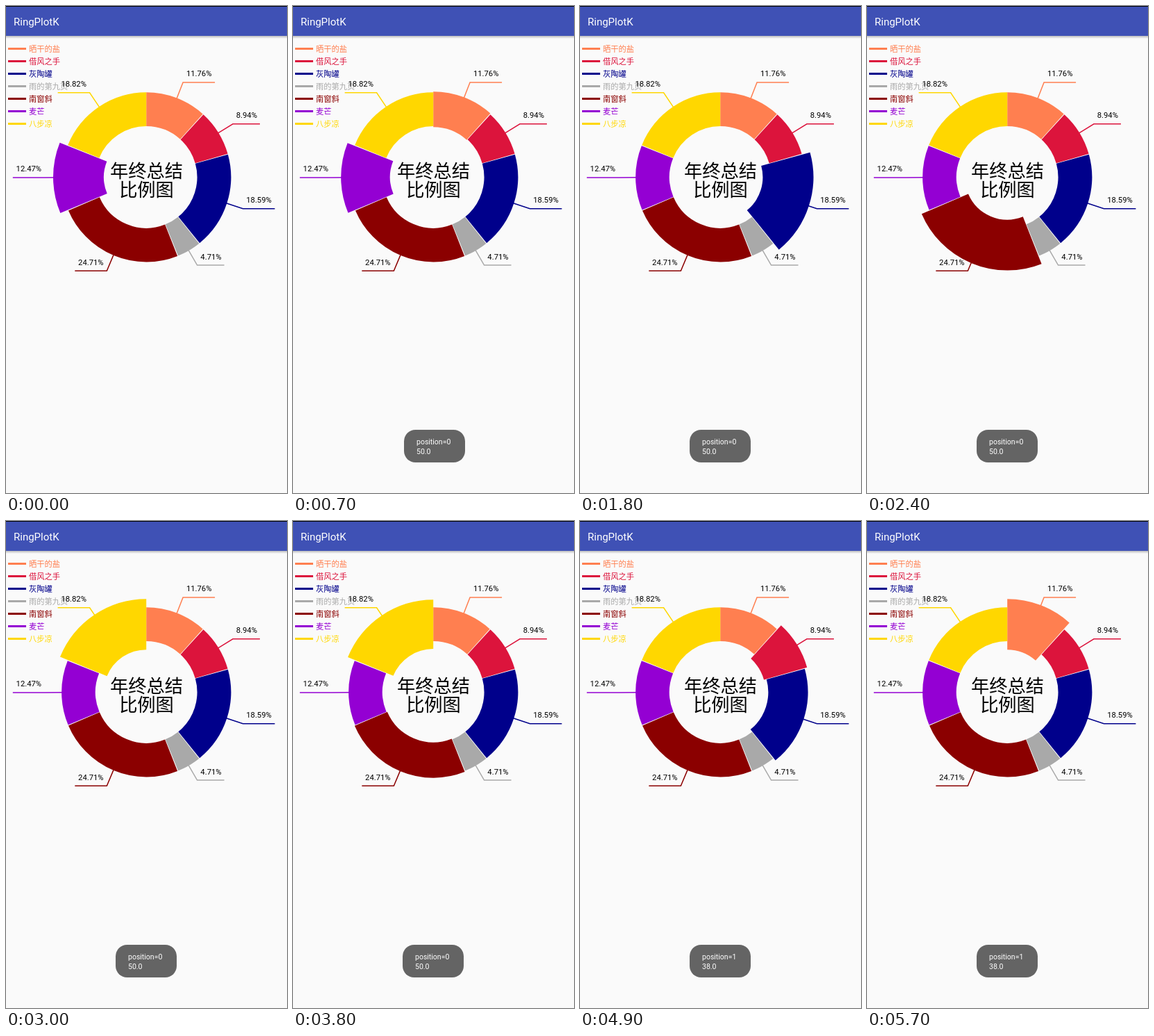
These frames come from a looping animation (405x701 px, 6.4 s). An HTML page:

```html
<!DOCTYPE html>
<html lang="zh">
<head>
<meta charset="utf-8">
<title>RingPlotK</title>
<style>
  html, body { margin: 0; width: 100%; height: 100%; overflow: hidden; background: #fafafa; }
  svg { display: block; width: 100vw; height: 100vh; }
  text { font-family: Roboto, "Noto Sans CJK SC", "Noto Sans CJK", sans-serif; }
  .title { font-size: 15px; fill: #fff; }
  .key, .label { font-size: 11.25px; }
  .heading { font-size: 26.25px; text-anchor: middle; }
  .toast text { font-size: 10.5px; fill: #fff; }
</style>
</head>
<body>
<svg viewBox="0 0 405 701">
  <defs>
    <linearGradient id="shade" x1="0" y1="0" x2="0" y2="1">
      <stop offset="0" stop-color="#000" stop-opacity=".25"/>
      <stop offset="1" stop-color="#000" stop-opacity="0"/>
    </linearGradient>
  </defs>
  <rect width="405" height="701" fill="#fafafa"/>
  <rect y="43" width="405" height="4" fill="url(#shade)"/>
  <rect width="405" height="43" fill="#3f51b5"/>
  <rect width="405" height="1" fill="#000"/>
  <text class="title" x="11" y="28">RingPlotK</text>
  <g id="legend"></g>
  <g id="leaders" fill="none" stroke-width="1.5"></g>
  <g id="ring" fill="none"></g>
  <g id="labels"></g>
  <text class="heading" x="202.5" y="247">年终总结</text>
  <text class="heading" x="202.5" y="273.5">比例图</text>
  <g class="toast" id="toast">
    <rect x="158" y="610" width="88" height="47" rx="16.5" fill="#646464"/>
    <text id="line1" x="176" y="631"></text>
    <text id="line2" x="176" y="645"></text>
  </g>
</svg>
<script>
const LOOP = 6400, TICK = 100;
const CX = 202.2, CY = 246.4, R = 122, MID = 97.7, THIN = 48.8, THICK = 73;

const slices = [
  { name: '晒干的盐', value: 50, color: '#ff7f50' },
  { name: '借风之手', value: 38, color: '#dc143c' },
  { name: '灰陶罐', value: 79, color: '#00008b' },
  { name: '雨的第九页', value: 20, color: '#a9a9a9' },
  { name: '南窗斜', value: 105, color: '#8b0000' },
  { name: '麦芒', value: 53, color: '#9400d3' },
  { name: '八步凉', value: 80, color: '#ffd700' }
];

// [start, end, slice that opens]
const moves = [
  [700, 900, 0], [1100, 1300, 1], [1600, 1800, 2], [2200, 2400, 4],
  [2900, 3000, 6], [3800, 4000, 4], [4100, 4300, 3], [4500, 4500, 2],
  [4900, 5000, 1], [5500, 5700, 0]
];
const FIRST = 5, EASE_MS = 250;

const $ = id => document.getElementById(id);

function add(parent, tag, attrs, text) {
  const el = document.createElementNS('http://www.w3.org/2000/svg', tag);
  for (const k in attrs) el.setAttribute(k, attrs[k]);
  if (text) el.textContent = text;
  return $(parent).appendChild(el);
}

// Degrees run clockwise from the top
function polar(deg, r) {
  const a = deg * Math.PI / 180;
  return [CX + r * Math.sin(a), CY - r * Math.cos(a)];
}

const total = slices.reduce((sum, s) => sum + s.value, 0);
let angle = 0;

slices.forEach((s, i) => {
  const y = 61.5 + i * 18;
  add('legend', 'path', { d: `M3 ${y}H29`, stroke: s.color, 'stroke-width': 3 });
  add('legend', 'text', { class: 'key', x: 33, y: y + 4.7, fill: s.color }, s.name);

  const sweep = s.value / total * 360;
  const gap = i < slices.length - 1 ? 0.5 : 0;
  const from = polar(angle, MID), to = polar(angle + sweep - gap, MID);
  s.arc = add('ring', 'path', { d: `M${from}A${MID} ${MID} 0 0 1 ${to}`, stroke: s.color });

  const mid = angle + sweep / 2;
  const label = (s.value / total * 100).toFixed(2) + '%';
  const len = label.length > 5 ? 46 : 39;
  const [ex, ey] = polar(mid, R * 1.2);
  const left = mid > 180 ? ex - len : ex;
  const tip = mid > 180 ? left : ex + len;
  add('leaders', 'path', { d: `M${polar(mid, R - 1)}L${ex} ${ey}H${tip}`, stroke: s.color });
  add('labels', 'text', { class: 'label', x: left + 4.8, y: ey - 8.5 }, label);
  angle += sweep;
});

function progress(t, start, end) {
  if (t < start) return 0;
  const k = Math.min(1, Math.max(0, 1 - (end - t) / EASE_MS));
  return (1 - Math.cos(k * Math.PI)) / 2;
}

function draw(now) {
  const t = Math.floor(now % LOOP / TICK) * TICK;

  const open = slices.map((s, i) => i === FIRST ? 1 : 0);
  let last = FIRST;
  for (const [start, end, next] of moves) {
    if (t < start) break;
    const p = progress(t, start, end);
    open[last] = 1 - p;
    open[next] = p;
    last = next;
  }
  slices.forEach((s, i) => {
    s.arc.setAttribute('stroke-width', THIN + (THICK - THIN) * open[i]);
  });

  const pos = t < 4200 ? 0 : 1;
  const drift = 2 * Math.max(0, 1 - (t - 700) / 300);
  $('toast').setAttribute('visibility', t < 700 ? 'hidden' : 'visible');
  $('toast').setAttribute('transform', `translate(${drift} 0)`);
  $('line1').textContent = 'position=' + pos;
  $('line2').textContent = slices[pos].value.toFixed(1);
}

const begin = performance.now();
function loop() {
  draw(performance.now() - begin);
  requestAnimationFrame(loop);
}
loop();
</script>
</body>
</html>
```
